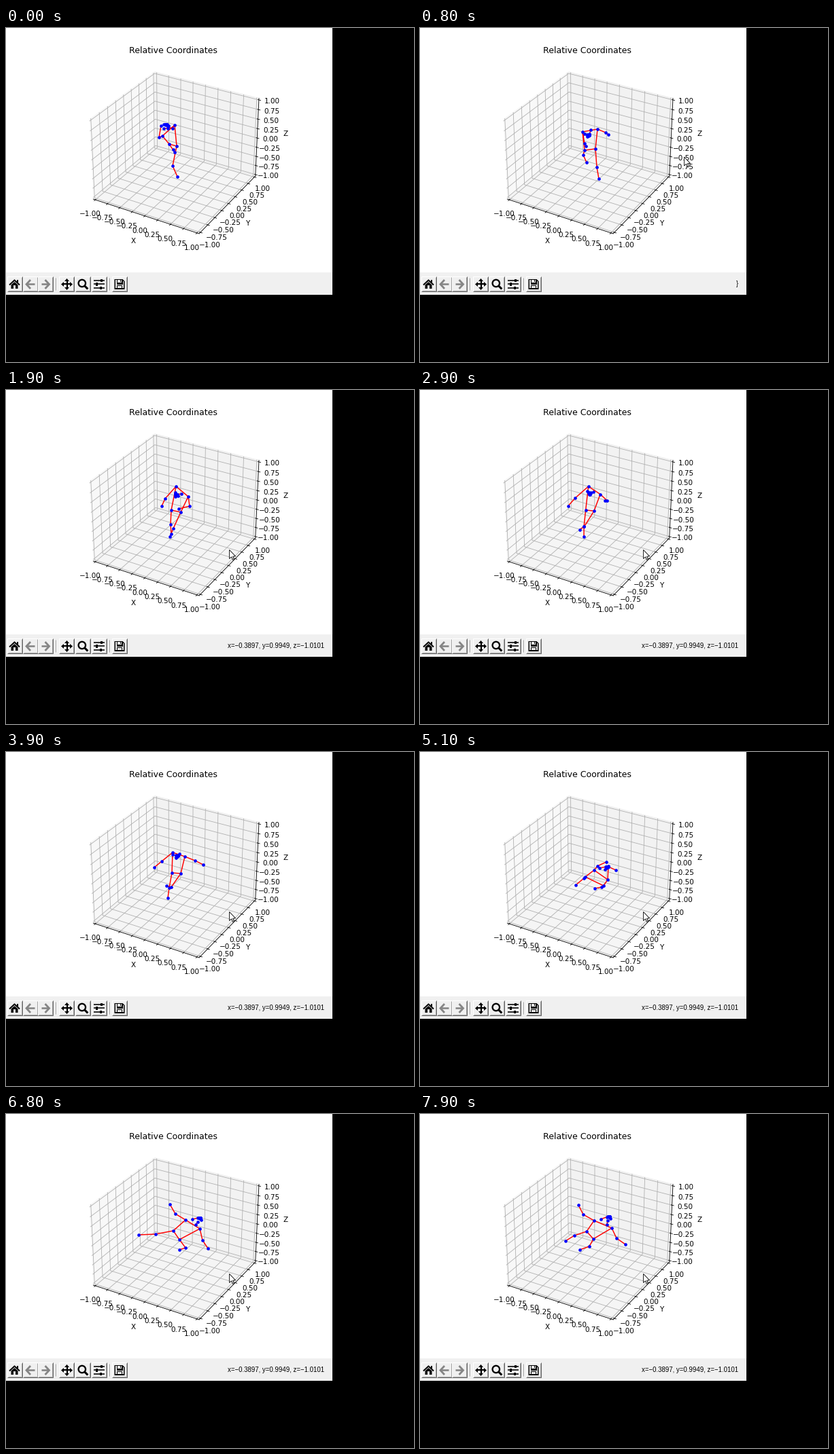
A matplotlib script that plays this animation: 600x492 px, repeating every 8 s.

```python
import numpy as np
import matplotlib.pyplot as plt
from matplotlib.animation import FuncAnimation
from matplotlib.patches import Circle, Polygon, Rectangle

W, H, DPI = 600, 492, 75
CANVAS_W, CANVAS_H = 480, 360
FRAMES, STEP = 80, 100
BAR = "#f0f0f0"

plt.rcParams["font.family"] = "DejaVu Sans"

# Key poses in stage pixels, one row per key time
KEYS = np.array([0, 800, 1900, 3900, 5100, 6800, 7900], float)

# left shoulder, right shoulder, left hip, right hip
TORSO = [
    [230, 159, 248, 143, 240, 171, 251, 174],
    [239, 153, 261, 149, 242, 180, 258, 178],
    [250, 142, 268, 157, 243, 177, 257, 180],
    [245, 148, 263, 154, 244, 178, 257, 179],
    [256, 174, 276, 188, 243, 184, 270, 197],
    [264, 156, 285, 169, 246, 172, 255, 185],
    [256, 157, 282, 168, 245, 173, 255, 184],
]
# left elbow, left wrist, right elbow, right wrist
ARMS = [
    [225, 161, 228, 144, 245, 148, 238, 146],
    [242, 170, 244, 174, 273, 154, 277, 157],
    [234, 160, 229, 171, 270, 171, 254, 175],
    [229, 161, 218, 170, 278, 160, 290, 166],
    [261, 168, 274, 162, 277, 169, 288, 174],
    [249, 147, 241, 133, 289, 186, 297, 198],
    [240, 148, 233, 134, 289, 183, 302, 192],
]
# left knee, left ankle, right knee, right ankle
LEGS = [
    [248, 183, 246, 179, 245, 203, 252, 219],
    [240, 187, 245, 198, 260, 205, 263, 222],
    [242, 198, 243, 212, 246, 204, 241, 216],
    [240, 200, 238, 215, 243, 199, 236, 197],
    [241, 186, 229, 196, 267, 199, 257, 201],
    [220, 177, 195, 178, 264, 197, 255, 200],
    [227, 179, 214, 187, 249, 195, 235, 200],
]
# nose, two ears, two mouth corners
FACE = [
    [235, 143, 232, 142, 239, 144, 232, 148, 238, 148],
    [248, 159, 242, 156, 251, 150, 246, 160, 249, 158],
    [250, 155, 249, 151, 258, 153, 253, 156, 249, 157],
    [252, 154, 245, 151, 255, 150, 250, 156, 253, 153],
    [276, 170, 264, 171, 277, 168, 272, 173, 274, 171],
    [285, 154, 274, 155, 287, 156, 282, 159, 279, 163],
    [278, 152, 266, 155, 280, 154, 276, 157, 275, 163],
]
POSES = np.hstack([TORSO, ARMS, LEGS, FACE]).reshape(len(KEYS), -1, 2)
SPEED = np.gradient(POSES, KEYS, axis=0) * 0.6

L_ELBOW, L_WRIST, R_ELBOW, R_WRIST, L_KNEE, L_ANKLE = range(4, 10)
NOSE, EAR_A, EAR_B = 12, 13, 14

# Extra swings between the key poses: joint, start, end, dx, dy
SWINGS = [
    (R_WRIST, 800, 1900, 6, -28), (R_ELBOW, 800, 1900, 2, -12),
    (L_WRIST, 800, 1900, -4, -12),
    (R_WRIST, 1900, 3100, 6, -32), (R_ELBOW, 1900, 3100, 4, -15),
    (L_WRIST, 5100, 6800, -6, -24), (L_ELBOW, 5100, 6800, -2, -10),
    (L_ANKLE, 5100, 6800, -10, -4), (L_KNEE, 5100, 6800, -4, -2),
    (L_ANKLE, 6800, 7900, -9, -2), (L_KNEE, 6800, 7900, -4, -1),
]
BONES = [(0, 1), (2, 3), (0, 2), (1, 3), (0, 4), (4, 5), (1, 6), (6, 7),
         (2, 8), (8, 9), (3, 10), (10, 11), (15, 16),
         (12, 17), (17, 18), (18, 19), (19, 13),
         (12, 20), (20, 21), (21, 22), (22, 14)]


def pose(t):
    """All landmarks at time t, by cubic Hermite between key poses."""
    k = min(np.searchsorted(KEYS, t, side="right") - 1, len(KEYS) - 2)
    span = KEYS[k + 1] - KEYS[k]
    s = (t - KEYS[k]) / span
    pts = ((2 * s**3 - 3 * s**2 + 1) * POSES[k]
           + (3 * s**2 - 2 * s**3) * POSES[k + 1]
           + (s**3 - 2 * s**2 + s) * span * SPEED[k]
           + (s**3 - s**2) * span * SPEED[k + 1])
    for joint, a, b, dx, dy in SWINGS:
        if a < t < b:
            pts[joint] += np.sin(np.pi * (t - a) / (b - a))**2 * np.array([dx, dy])
    nose = pts[NOSE]
    eyes = [nose + (pts[ear] - nose) * f + (side, -1)
            for ear, side in ((EAR_A, -0.8), (EAR_B, 0.8))
            for f in (0.05, 0.12, 0.2)]
    return np.vstack([pts, eyes])


def stage_axes(z):
    a = fig.add_axes([0, 0, 1, 1], zorder=z)
    a.set(xlim=(0, W), ylim=(H, 0))
    a.axis("off")
    return a


def box(x, y, w, h, color):
    base.add_patch(Rectangle((x, y), w, h, fc=color, lw=0))


def stroke(pts, width, color="black"):
    x, y = zip(*pts)
    base.plot(x, y, color=color, lw=width * 0.96,
              solid_capstyle="butt", solid_joinstyle="miter")


def shape(pts, color="black"):
    base.add_patch(Polygon(pts, fc=color, lw=0))


def button(x, y=366, w=22, h=22):
    stroke([(x, y + h), (x, y), (x + w, y)], 1, "white")
    stroke([(x + 1, y + h - 1), (x + w - 1, y + h - 1), (x + w - 1, y + 1)], 1, "#a0a0a0")
    stroke([(x, y + h), (x + w, y + h), (x + w, y)], 1, "#696969")


def separator(x):
    stroke([(x, 368), (x, 386)], 1, "#a0a0a0")
    stroke([(x + 1, 368), (x + 1, 386)], 1, "white")


def side_arrow(cx, d):
    stroke([(cx - 6 * d, 377.5), (cx + 5 * d, 377.5)], 2.6, "#858585")
    stroke([(cx, 371), (cx + 6 * d, 377.5), (cx, 384)], 2.8, "#858585")


def toolbar():
    box(0, CANVAS_H, CANVAS_W, 33.5, BAR)
    for x in (2, 25, 47, 78, 102, 126, 156):
        button(x)
    separator(73)
    separator(152)
    # home
    stroke([(5, 378.5), (12.5, 371.5), (20, 378.5)], 2)
    box(16, 371, 2.2, 4, "black")
    shape([(7.5, 378.5), (12.5, 374), (17.5, 378.5), (17.5, 384), (7.5, 384)])
    box(11, 379.5, 3, 4.5, BAR)
    # back, forward
    side_arrow(36, -1)
    side_arrow(57.5, 1)
    # pan
    cx, cy = 89.5, 377.5
    stroke([(cx - 6, cy), (cx + 6, cy)], 2.2)
    stroke([(cx, cy - 6), (cx, cy + 6)], 2.2)
    for dx, dy in ((1, 0), (-1, 0), (0, 1), (0, -1)):
        shape([(cx + 8.5 * dx, cy + 8.5 * dy),
               (cx + 4.5 * dx + 3.5 * dy, cy + 4.5 * dy + 3.5 * dx),
               (cx + 4.5 * dx - 3.5 * dy, cy + 4.5 * dy - 3.5 * dx)])
    # zoom
    base.add_patch(Circle((111.8, 376), 5.2, fc="none", ec="black", lw=2.2))
    stroke([(115.3, 379.5), (120.3, 384.5)], 3)
    # sliders
    for y, knob in ((372, 140), (377.5, 133), (383, 139)):
        stroke([(129, y), (145, y)], 1.6)
        box(knob - 1.5, y - 2.4, 3, 4.8, "black")
    # save
    shape([(159.5, 370), (171.5, 370), (174.5, 373), (174.5, 385), (159.5, 385)])
    box(161.3, 371.5, 1.2, 12, BAR)
    box(164.3, 371.5, 5.5, 3.6, BAR)
    box(167.5, 371.5, 1.6, 3, "black")
    box(171.6, 373.5, 1.3, 10, BAR)
    box(162.3, 378.5, 9.5, 5, BAR)
    box(163.3, 379.5, 7.5, 4, "black")
    box(164.2, 380.3, 5.7, 3.2, BAR)


def signed(v, digits):
    return f"{v:.{digits}f}".replace("-", "\u2212")


def plot_box():
    ax = fig.add_axes([60 / W, (H - CANVAS_H + 39.6) / H, 372 / W, 277.2 / H],
                      projection="3d", zorder=1)
    lim = 25 / 24
    ticks = np.linspace(-1, 1, 9)
    ax.set(xlim=(-lim, lim), ylim=(-lim, lim), zlim=(-lim, lim),
           xticks=ticks, yticks=ticks, zticks=ticks,
           xlabel="X", ylabel="Y", zlabel="Z")
    for axis in (ax.xaxis, ax.yaxis, ax.zaxis):
        axis.set_major_formatter(lambda v, _: signed(v, 2))
    ax.set_title("Relative Coordinates")


# The small extra keeps the height from rounding down a pixel
fig = plt.figure(figsize=(W / DPI, (H + 0.01) / DPI), dpi=DPI, facecolor="black")
base = stage_axes(0)
box(0, 0, CANVAS_W, CANVAS_H, "white")
toolbar()
plot_box()

top = stage_axes(2)
bones, = top.plot([], [], color="red", lw=1.4)
dots, = top.plot([], [], "o", color="blue", ms=4.5, mew=0)
status = top.text(468.5, 380.3, "", family="Liberation Sans", size=9.3,
                  ha="right", va="baseline")
ARROW = np.array([(0, 0), (0, 13), (3, 10.3), (5.2, 15), (7, 14.2), (5, 9.6), (9, 9.4)])
cursor = Polygon(ARROW, fc="white", ec="black", lw=0.8)
top.add_patch(cursor)

PATH_T = [100, 400, 800, 1300, 1800]
PATH_X = [502, 462, 388.5, 338, 328.5]
PATH_Y = [480, 345, 190, 224, 235.5]


def readout(t, x, y):
    if t < 800:
        return ""
    if t < 900:
        return "}"
    dx, dy = x - PATH_X[-1], y - PATH_Y[-1]
    vals = (-0.3897 + 0.013 * dx, 0.9949 - 0.004 * dx, -1.0101 - 0.018 * dy)
    return ", ".join(f"{n}={signed(v, 4)}" for n, v in zip("xyz", vals))


def update(i):
    t = i * STEP
    pts = pose(t)
    gap = [np.nan, np.nan]
    path = np.array([p for a, b in BONES for p in (pts[a], pts[b], gap)])
    bones.set_data(path[:, 0], path[:, 1])
    dots.set_data(pts[:, 0], pts[:, 1])
    x, y = np.interp(t, PATH_T, PATH_X), np.interp(t, PATH_T, PATH_Y)
    cursor.set_xy(ARROW + (x, y))
    cursor.set_visible(t >= 100)
    status.set_text(readout(t, x, y))
    return bones, dots, cursor, status


anim = FuncAnimation(fig, update, frames=FRAMES, interval=STEP, repeat=True,
                     repeat_delay=0, blit=False)
plt.show()
```
